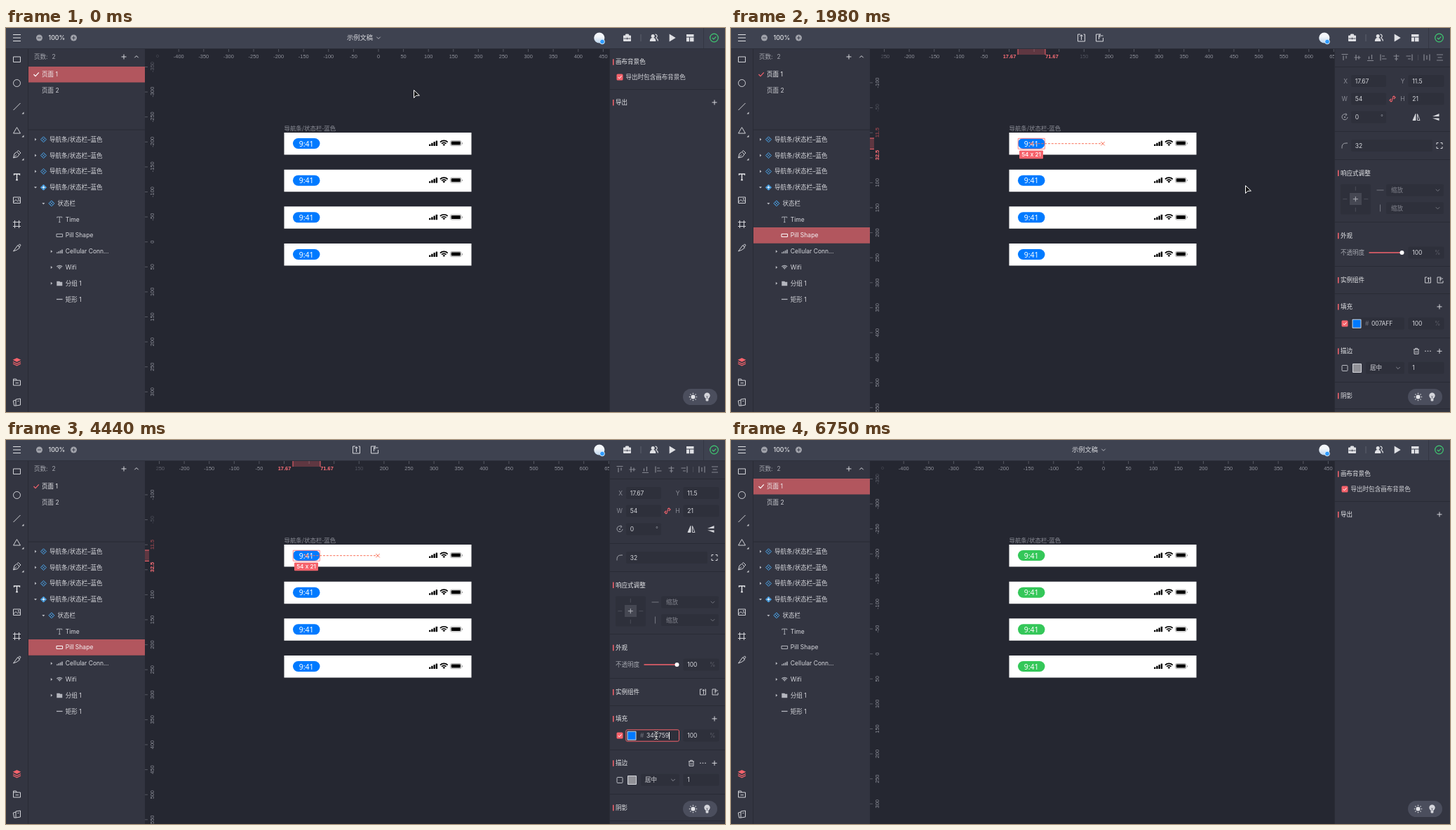
An HTML page with a canvas for the animation above (7.89 s loop, 1025 by 547 pixels).

```html
<!DOCTYPE html>
<html lang="zh-CN">
<head>
<meta charset="utf-8">
<title>Colour edit</title>
<style>
html, body { margin: 0; width: 100%; height: 100%; overflow: hidden; background: #252731; }
canvas { display: block; width: 1025px; height: 547px; }
</style>
</head>
<body>
<canvas id="stage"></canvas>
<script>
const W = 1025, H = 547, LOOP = 7890;
const UI = 'Inter, "Noto Sans CJK SC", "Noto Sans CJK", sans-serif';
const CJK = '"Noto Sans CJK SC", "Noto Sans CJK", sans-serif';
const ARIAL = '"Liberation Sans", sans-serif';
const BAR = '#3e4250', PANEL = '#333541', CANVAS = '#252731', FIELD = '#2e303b', LINE = '#292b35';
const RED = '#f5636c', ROW = '#b2565e', BLUE = '#007aff', GREEN = '#34c759';
const FG = '#d6d7dc', DIM = '#8b8d97', FAINT = '#5b5d68', SKY = '#4ba6ec';

// [time, x, y]: the pointer jumps from one place to the next
const POINTER = [
  [0, 581, 88], [140, 574, 93], [300, 543, 113], [480, 485, 147], [650, 447, 168],
  [790, 444, 168], [940, 439, 167], [1090, 437, 167], [1830, 592, 211], [1980, 733, 224],
  [2360, 782, 254], [2510, 850, 315], [2660, 905, 372], [2810, 928, 402], [2950, 929, 411],
  [3100, 928, 420], [3240, 927, 421], [5040, 925, 421], [5210, 848, 424], [5360, 758, 418],
  [5510, 722, 414], [6260, 737, 430], [6430, 785, 482], [6590, 833, 535], [6750, 900, 600]
];

const stage = document.getElementById('stage'), c = stage.getContext('2d');
const ratio = window.devicePixelRatio || 1;
stage.width = W * ratio;
stage.height = H * ratio;

function box(x, y, w, h, fill, r = 0) {
  c.fillStyle = fill;
  c.beginPath();
  c.roundRect(x, y, w, h, r);
  c.fill();
}
function frame(x, y, w, h, color, width = 1, r = 0) {
  c.strokeStyle = color;
  c.lineWidth = width;
  c.beginPath();
  c.roundRect(x, y, w, h, r);
  c.stroke();
}
function dot(x, y, r, fill, stroke, width = 1) {
  c.beginPath();
  c.arc(x, y, r, 0, 7);
  if (fill) { c.fillStyle = fill; c.fill(); }
  if (stroke) { c.strokeStyle = stroke; c.lineWidth = width; c.stroke(); }
}
// SVG path centred on x, y
function icon(d, x, y, stroke = FG, fill = null, width = 1) {
  const path = new Path2D(d);
  c.save();
  c.translate(x, y);
  if (fill) { c.fillStyle = fill; c.fill(path); }
  if (stroke) { c.strokeStyle = stroke; c.lineWidth = width; c.stroke(path); }
  c.restore();
}
function text(s, x, y, color = FG, size = 8.54, align = 'left', font = UI, weight = 400) {
  c.font = `${weight} ${size}px ${font}`;
  c.textAlign = align;
  c.fillStyle = color;
  c.fillText(s, x, y + size * .36);
}
const plus = (x, y, color = FG) => icon('M-3.5 0H3.5M0-3.5V3.5', x, y, color);
const chevron = (x, y, color = DIM) => icon('M-2.7-1.3L0 1.4 2.7-1.3', x, y, color);
const rule = y => box(861, y, 164, 1, LINE);
function check(x, y) {
  box(x - 4.5, y - 4.5, 9, 9, RED, 1.5);
  icon('M-2.3 0L-.6 1.8 2.5-1.6', x, y, '#fff');
}
function heading(s, y) {
  box(865, y - 4, 1.5, 8.5, RED);
  text(s, 869, y, '#e6e7ea', 8.54, 'left', UI, 500);
}

function topBar(selected) {
  box(0, 0, W, 29, BAR);
  box(0, 29, W, 1, '#2d303a');
  icon('M-5.5-4.5H5.5M-5.5 0H5.5M-5.5 4.5H5.5', 15.5, 14, '#e2e3e6');
  for (const [x, d] of [[47.5, 'M-2.4 0H2.4'], [96.5, 'M-2.4 0H2.4M0-2.4V2.4']]) {
    dot(x, 14, 4.5, '#a0a2aa');
    icon(d, x, 14, BAR);
  }
  text('100%', 60.5, 14, '#e2e3e6', 8.8, 'left', UI, 500);
  if (selected) {
    icon('M-1.5-5H-5V5H5V-5H3M0 3V-4M-2.2-2L0-4.4 2.2-2', 499.5, 14, FG);
    icon('M1.5-5H-5V5H5V0M5-3H-1V2M1.2-5.2L-1.2-3 1.2-.8', 525.5, 14, FG);
  } else {
    text('示例文稿', 504.5, 14, FG, 9.25, 'center');
    chevron(531, 14, '#b3b5bc');
  }
  const sky = c.createLinearGradient(0, 7, 0, 22);
  sky.addColorStop(.35, '#f3f6fa');
  sky.addColorStop(1, '#b9d3ec');
  dot(845.8, 14, 7.6, sky);
  dot(850, 19.5, 3.4, '#2f9bff', '#fff', .8);
  icon('M-5-3H5V4.5H-5zM-2-3V-5H2V-3', 885.5, 14, '#dfe0e4', '#dfe0e4');
  icon('M-5 1H5M0-.4V2.3', 885.5, 14, BAR, null, .9);
  box(904.5, 9, 1, 10, '#5c606d');
  dot(922.2, 11.5, 2.5, '#dfe0e4');
  icon('M-6.2 5Q-6-.3-1.8 0 2.2-.3 2.4 5z', 924, 14, null, '#dfe0e4');
  icon('M1.5-4.8A2.4 2.4 0 0 1 2 0M3 .7Q5.4 1.5 5.4 4.6', 924, 14, '#dfe0e4', null, 1.2);
  icon('M-4.3-5.5L4.7 0-4.3 5.5z', 950, 14, null, '#dfe0e4');
  box(970, 9, 10.5, 3.5, '#dfe0e4');
  box(970, 13.5, 4, 5.8, '#dfe0e4');
  box(975, 13.5, 5.5, 5.8, '#dfe0e4');
  box(994, 0, 1, 29, '#343743');
  dot(1009.5, 14, 5.8, null, '#3fca72', 1.2);
  icon('M-2.7 0L-.7 2 2.8-1.7', 1009.5, 14, '#3fca72', null, 1.2);
}

function toolBar() {
  box(0, 30, 31, 517, PANEL);
  box(31, 30, 1, 517, LINE);
  const x = 15.5, ink = '#d2d3d8';
  frame(10.5, 41, 10, 7.5, ink);
  dot(x, 78.5, 5, null, ink);
  icon('M-5 5L5-5', x, 112, ink);
  icon('M0-4.5L5 4H-5z', x, 146, ink);
  icon('M-5 5L-3.5-1 0-3.5 3.5 0 1 3.5zM-5 5L-.5.5M.5-4L2-5.5 5.5-2 4-.5', x, 180, ink);
  for (const y of [121, 154, 187]) icon('M1.5-1.5V1.5H-1.5z', 24, y, null, ink);
  icon('M-4-2.2V-4H4V-2.2M0-4V4.5M-1.5 4.5H1.5', x, 212, '#e6e7ea', null, 1.4);
  icon('M-5-4H5V4.5H-5zM-5 3L-1.5-.5 1 2 3 .3 5 2.5', x, 245, ink);
  dot(17.8, 243.4, .9, ink);
  icon('M-3-5.5V5.5M3-5.5V5.5M-5.5-3H5.5M-5.5 3H5.5', x, 279.5, ink);
  icon('M-5 5L1.2-3.5 4 .2 0 3zM2-3L4-5.2 5.4-3.8 3.7-1', x, 313, ink);
  icon('M0-5.5L5.8-2.7 0 .2-5.8-2.7z', x, 475.5, null, RED);
  icon('M-5.5 0L0 2.8 5.5 0M-5.5 2.5L0 5.3 5.5 2.5', x, 475.5, RED, null, 1.2);
  icon('M-5-4.5H-1L0-2.5H5V4.5H-5zM-5-2.5H0M-2 1.2H2.5', x, 504.5, ink);
  icon('M-1.5-4L5-5V4L-1.5 5zM-1.5-3L-5.2-2-4 5H-1.5M1-1.5L3-1.8', x, 533, ink);
}

const LAYERS = [
  [0, 'component', '导航条/状态栏–蓝色', '>'], [0, 'component', '导航条/状态栏–蓝色', '>'],
  [0, 'component', '导航条/状态栏–蓝色', '>'], [0, 'master', '导航条/状态栏–蓝色', 'v'],
  [1, 'component', '状态栏', 'v'], [2, 'text', 'Time'], [2, 'rect', 'Pill Shape'],
  [2, 'bars', 'Cellular Conn...', '>'], [2, 'wifi', 'Wifi', '>'],
  [2, 'folder', '分组 1', '>'], [2, 'line', '矩形 1']
];
function signal(x, y, color, k = 1) {
  for (let i = 0; i < 4; i++) {
    const h = (2.6 + i * 1.8) * k;
    box(x + i * 3.4 * k, y - h, 2.5 * k, h, color, .6);
  }
}
function wifi(x, y, color, k = 1) {
  c.strokeStyle = color;
  c.lineWidth = 1.7 * k;
  for (const r of [7.6, 4.6]) {
    c.beginPath();
    c.arc(x, y + 4 * k, r * k, -Math.PI * .75, -Math.PI * .25);
    c.stroke();
  }
  icon(`M0 ${4 * k}L${-1.9 * k} ${2 * k}Q0 ${.4 * k} ${1.9 * k} ${2 * k}z`, x, y, null, color);
}
function layerIcon(kind, x, y, ink) {
  if (kind === 'component' || kind === 'master') {
    icon('M0-4L4 0 0 4-4 0z', x, y, SKY, kind === 'master' ? SKY : null);
    icon('M-2-2L2 2M2-2L-2 2', x, y, kind === 'master' ? PANEL : SKY, null, .7);
    if (kind === 'master') icon('M0-2L2 0 0 2-2 0z', x, y, null, '#d5ebfb');
  }
  if (kind === 'text') icon('M-3.5-2V-3.5H3.5V-2M0-3.5V4M-1.3 4H1.3', x, y, ink, null, .9);
  if (kind === 'rect') frame(x - 4.3, y - 2, 8.6, 4, ink);
  if (kind === 'bars') signal(x - 4.3, y + 3, '#a3a5ad', .7);
  if (kind === 'wifi') wifi(x, y, ink, .72);
  if (kind === 'folder') icon('M-4-3H0L1-2H4V3.5H-4z', x, y, null, ink);
  if (kind === 'line') box(x - 4.3, y - .7, 8.6, 1.3, ink);
}
function layerPanel(selected, hover) {
  box(32, 30, 166, 517, PANEL);
  text('页数:', 40, 41, '#a4a6ae');
  text('2', 65.5, 41, '#a4a6ae');
  plus(168, 41);
  icon('M-2.7 1.3L0-1.4 2.7 1.3', 186, 41, FG);
  if (!selected) box(32, 55, 166, 22.5, ROW);
  icon('M-3.5 0L-1 2.6 3.8-2.6', 43, 66, selected ? RED : '#fff', null, 1.2);
  text('页面 1', 51, 66, '#f0f0f2');
  text('页面 2', 51, 89, '#cfd0d5');
  box(32, 144.5, 166, 1, LINE);
  LAYERS.forEach(([depth, kind, name, arrow], i) => {
    const y = 158.8 + i * 22.77, x = 53.5 + depth * 11.4, active = selected && i === 6;
    if (active) box(32, y - 11.4, 166, 22.8, ROW);
    if (hover === i) frame(32.5, y - 10.9, 165, 21.8, RED);
    if (arrow) icon(arrow === '>' ? 'M-1-2L1.5 0-1 2z' : 'M-2-1H2L0 1.5z', x - 11.5, y, null, '#b8bac1');
    layerIcon(kind, x, y, active ? '#fff' : '#b4b6be');
    text(name, x + 8.5, y, active ? '#f4f4f6' : FG);
  });
}

function turned(s, x, y, ...style) {
  c.save();
  c.translate(x, y);
  c.rotate(-Math.PI / 2);
  text(s, 0, 0, ...style);
  c.restore();
}
function rulers(selected) {
  const step = 35.6, label = [7.4, 'center', ARIAL], ink = '#8f919b', faded = '#50525d';
  const x0 = selected ? 396.5 : 531, y0 = selected ? 149.2 : 304.7;
  const hiddenX = [0, 50, 100], hiddenY = [0, 50];
  for (let n = -9; n <= 13; n++) {
    const v = n * 50, x = x0 + n * step, y = y0 + n * step;
    if (x > 212 && x < 862) {
      box(x - .5, 30, 1, 4, '#565862');
      const edge = x < 225 || selected && v === 150;
      if (!(selected && hiddenX.includes(v))) text(v, x, 40.3, edge ? faded : ink, ...label);
    }
    if (y > 40 && y < 547) {
      box(198, y - .5, 4, 1, '#565862');
      const edge = y < 60 || selected && v === -50;
      if (!(selected && hiddenY.includes(v))) turned(v, 208.5, y, edge ? faded : ink, ...label);
    }
  }
  box(198, 30, 20, 20, CANVAS);
  if (!selected) {
    dot(216, 40, 1.7, null, '#3b3d47');
    turned('-350', 208.5, y0 - 7 * step, faded, ...label);
    return;
  }
  text('250', 220, 40.3, faded, ...label);
  box(409, 30, 39, 8, 'rgba(245,99,108,.28)');
  box(408.5, 30, 1, 8, RED);
  box(447.5, 30, 1, 8, RED);
  box(198, 157, 6, 15.5, 'rgba(245,99,108,.28)');
  box(198, 156.5, 6, 1, RED);
  box(198, 172, 6, 1, RED);
  text('17.67', 397, 40.3, '#ff7079', ...label, 700);
  text('71.67', 457.5, 40.3, '#ff7079', ...label, 700);
  turned('11.5', 208.5, 149, '#8b434b', ...label, 700);
  turned('32.5', 208.5, 181, '#ff7079', ...label, 700);
}

function artboards(color) {
  text('导航条/状态栏-蓝色', 396.5, 143, '#8b8d96', 8.45, 'left', CJK);
  for (let i = 0; i < 4; i++) {
    const y = 149 + i * 52.67, mid = y + 15.5;
    box(396.5, y, 267, 31.5, '#fff');
    box(409, y + 8, 38.5, 15, color, 7.5);
    text('9:41', 428.2, mid + .3, '#fff', 10.5, 'center', '"Noto Sans", sans-serif');
    signal(603, y + 19, '#000', .95);
    wifi(624.3, mid - .5, '#000', 1);
    frame(633.5, y + 11.5, 15.5, 7.2, '#9b9b9b', .8, 2);
    box(634.7, y + 12.6, 13.2, 5, '#000', 1);
    box(650, y + 14, 1, 2.4, '#9b9b9b', .5);
  }
}
function selection() {
  frame(409.3, 157.3, 38, 15, '#ff8288');
  c.setLineDash([3, 1.8]);
  icon('M0 0H102', 428, 164.7, '#f97058');
  c.setLineDash([]);
  for (const x of [428, 530]) icon('M-2.7-2.7L2.7 2.7M2.7-2.7L-2.7 2.7', x, 164.7, '#f97058');
  box(411, 174.5, 34, 11.8, RED, 1);
  text('54 x 21', 428, 180.4, '#fff', 8.2, 'center', UI, 500);
}

function canvasPanel() {
  heading('画布背景色', 48.3);
  check(875, 70);
  text('导出时包含画布背景色', 883.5, 70);
  rule(87);
  heading('导出', 106);
  plus(1010, 106);
}
function field(label, value, x, y, w = 51) {
  text(label, x - 5, y, DIM, 8.5, 'right');
  box(x, y - 8.5, w, 17, FIELD, 2);
  text(value, x + 5.8, y, FG, 8.5);
}
function percent(y) {
  field('', '100', 965.5, y);
  text('%', 1003, y, FAINT, 8.5);
}
function alignIcons() {
  const y = 42, ink = '#868892';
  const top = 'M-4.5-4.5H4.5M-2-2.5V4M2-2.5V1.5', mid = 'M-4.5 0H4.5M-2-4V4M2-2.5V2.5';
  [[875, top, 0], [893, mid, 0], [911.5, top, 2], [930.5, top, 3], [948.5, mid, 1], [966.5, top, 1],
   [992, 'M-4-4.5V4.5M4-4.5V4.5M0-3V3', 0], [1010.5, 'M-4-4.5V4.5M4-4.5V4.5M0-3V3', 1]
  ].forEach(([x, d, quarter]) => {
    c.save();
    c.translate(x, y);
    c.rotate(quarter * Math.PI / 2);
    icon(d, 0, 0, ink, null, 1.2);
    c.restore();
  });
  box(979, 38, 1, 8, '#484a55');
}
function shapePanel(t, color) {
  alignIcons();
  rule(55);
  field('X', '17.67', 884, 75.5, 50);
  field('Y', '11.5', 965.5, 75.5);
  field('W', '54', 884, 101, 50);
  field('H', '21', 965.5, 101);
  icon('M-1 1L1-1M0-2L2-4 4-2 2 0M0 2L-2 4-4 2-2 0', 943, 101, RED, null, 1.2);
  field('', '0', 884, 127, 50);
  text('°', 926, 127, DIM);
  icon('M2-3.8A4 4 0 1 0 4 0M1.4-5.5L3-3.5 1-2', 875, 127, '#a0a2aa');
  dot(875, 127, 1, '#a0a2aa');
  icon('M-1-4.5V4.5H-5zM1.5-4.5V4.5H5z', 977, 127, FG, null, .9);
  icon('M-1-4.5V4.5H-5z', 977, 127, null, FG);
  icon('M-5-1L4.5-5V-1zM-5 1.5H4.5V5z', 1005, 127, null, FG);
  rule(147);
  icon('M-4 4V2Q-4-3.5 2-3.5H4', 875, 167.5, '#a0a2aa');
  field('', '32', 884, 167.5, 116);
  icon('M-4-1.5V-4H-1.5M1.5-4H4V-1.5M4 1.5V4H1.5M-1.5 4H-4V1.5', 1010, 167.5, FG);
  rule(187);

  heading('响应式调整', 206.5);
  box(869, 222.5, 43, 43, FIELD, 2);
  box(882, 235, 17, 17, '#454752');
  plus(890.3, 243.7, '#b0b2b9');
  icon('M0-18V-12M0 12V18M-18 0H-12M12 0H18', 890.3, 243.7, '#4d4f5a');
  [['M-5 0H5', 231], ['M0-5V5', 256.5]].forEach(([d, y]) => {
    icon(d, 925.5, y, '#747680');
    box(934, y - 8.5, 82, 17, FIELD, 2);
    text('缩放', 941, y, '#80828c');
    chevron(1007.5, y, '#747680');
  });
  rule(276);

  heading('外观', 295.7);
  text('不透明度', 869, 320, '#a4a6ae');
  box(909.5, 319.2, 47, 1.6, RED);
  dot(956.5, 320, 3, '#fff');
  percent(320);
  rule(339);
  heading('实例组件', 359);
  icon('M-1-4H-4V4H4V-4H3M1 3V-3M-1-1.5L1-3.6 3-1.5', 993.5, 359, FG, null, .9);
  icon('M1-4H-4V4H4V1M4-2H0V2M1.5-4L-.5-2 1.5 0', 1011, 359, FG, null, .9);
  rule(378);

  heading('填充', 397);
  plus(1010, 397);
  check(875, 421);
  box(884, 412.5, 76, 17, FIELD, 2);
  box(885.5, 414.7, 13, 13, '#d4d6dc', 1);
  box(886.5, 415.7, 11, 11, color);
  const editing = t >= 3540 && t < 5040, typed = t >= 4440;
  if (editing && !typed) box(913, 414.5, 32, 12.5, '#3d6695');
  text('#', 904, 421, '#747680', 8.5);
  text(typed ? '34C759' : '007AFF', 913, 421, FG, 8.5);
  if (editing) {
    frame(883.8, 412.8, 75.7, 16.4, RED, 1, 2);
    if (typed) box(945, 416, 1, 10.5, '#fff');
  }
  percent(421);
  rule(441);

  heading('描边', 460.3);
  icon('M-4-2.5H4M-1.5-2.5V-4H1.5V-2.5M-3-2.5V4H3V-2.5M-1 0V2.2M1 0V2.2', 977, 460.3, FG, null, .9);
  for (const x of [990, 993.5, 997]) dot(x, 460.3, .8, FG);
  plus(1010, 460.3);
  frame(871, 480.5, 8, 8, '#b9bbc2', 1, 1);
  box(886, 478, 13, 13, '#d4d6dc', 1);
  box(887, 479, 11, 11, '#929298');
  box(905, 475.7, 55, 17, FIELD, 2);
  text('居中', 911, 484.3);
  chevron(951, 484.3);
  field('', '1', 965.5, 484.3);
  rule(504);
  heading('阴影', 523.7);
  rule(542);
}

function themeSwitch() {
  box(965, 514, 49, 23, '#4b4e5d', 11.5);
  dot(979.5, 525.5, 3, '#e3e4e8');
  for (let i = 0; i < 8; i++) {
    const a = i * Math.PI / 4;
    dot(979.5 + 5 * Math.cos(a), 525.5 + 5 * Math.sin(a), .75, '#e3e4e8');
  }
  dot(999.5, 523.8, 4.2, '#d5d6dc');
  box(997.6, 527, 3.8, 4.4, '#d5d6dc', 1);
  icon('M0 3V0M-1.5-1L0 .5 1.5-1', 999.5, 525, '#4b4e5d', null, .7);
}

function pointer(t) {
  const [, x, y] = POINTER.findLast(step => t >= step[0]);
  if (t >= 3100 && t < 5210) {
    const beam = 'M-2.5-5.5Q0-5.5 0-4 0-5.5 2.5-5.5M0-4V4M-2.5 5.5Q0 5.5 0 4 0 5.5 2.5 5.5M-1.5 1.5H1.5';
    icon(beam, x, y, '#15161b', null, 2);
    icon(beam, x, y, '#fff', null, .9);
  } else {
    c.lineJoin = 'round';
    icon('M.5.5V11.5L3.6 8.3 8.4 8z', x, y, '#fff', '#111', 1);
    c.lineJoin = 'miter';
  }
}

function draw(t) {
  const selected = t >= 1980 && t < 5960;
  const color = t >= 5040 ? GREEN : BLUE;
  const hover = t >= 790 && t < 940 ? 10 : t >= 940 && t < 1980 ? 6 : -1;
  c.setTransform(ratio, 0, 0, ratio, 0, 0);
  box(0, 0, W, H, CANVAS);
  rulers(selected);
  artboards(color);
  if (hover === 10) frame(397, 149.5, 266, 30.5, RED);
  if (hover === 6) frame(409, 157, 38.5, 15.5, RED, 1.3);
  if (selected) selection();
  box(860, 30, 165, 517, PANEL);
  box(860, 30, 1, 517, LINE);
  selected ? shapePanel(t, color) : canvasPanel();
  themeSwitch();
  layerPanel(selected, hover);
  toolBar();
  topBar(selected);
  pointer(t);
}

const start = performance.now();
function tick() {
  draw((performance.now() - start) % LOOP);
  requestAnimationFrame(tick);
}
tick();
</script>
</body>
</html>
```
